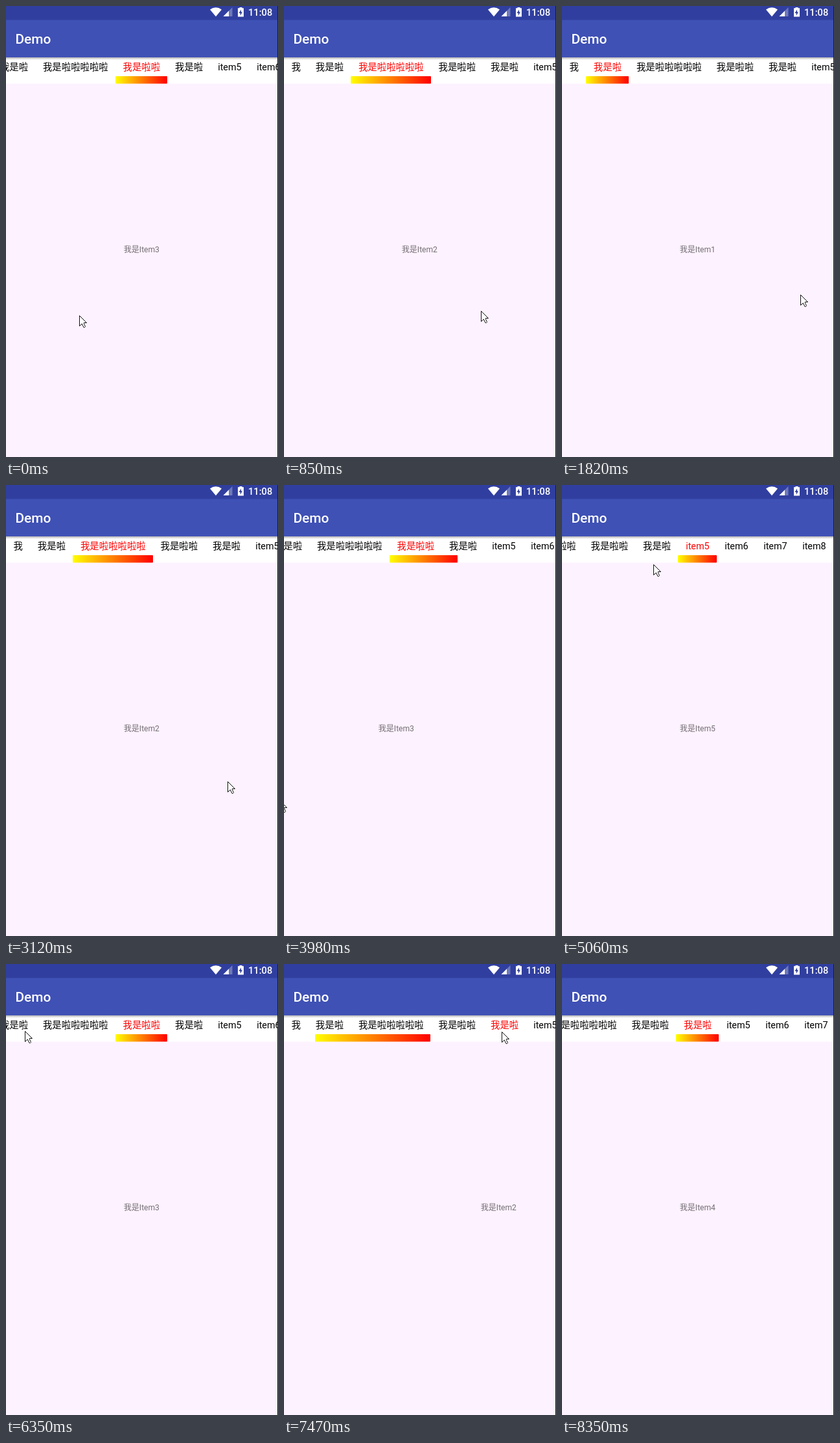
An HTML page that plays this animation: 420 by 694 pixels, repeating every 8840 ms.

```html
<!DOCTYPE html>
<html lang="zh">
<head>
<meta charset="utf-8">
<title>Demo</title>
<style>
  html, body { margin: 0; width: 100%; height: 100%; overflow: hidden; background: #fdf2ff; }
  svg { display: block; width: 420px; height: 694px; font-family: Roboto, "Noto Sans CJK SC", "Noto Sans CJK", sans-serif; }
  .bar { fill: #fff; font-weight: 500; }
  #tabs { font-size: 14.4px; }
  #tabs .on { fill: #f00; }
  #pages { font-size: 12.1px; fill: #746f75; text-anchor: middle; }
</style>
</head>
<body>
<svg viewBox="0 0 420 694">
  <defs>
    <linearGradient id="glow"><stop stop-color="#ff0"/><stop offset="1" stop-color="#f00"/></linearGradient>
    <linearGradient id="shade" x2="0" y2="1">
      <stop stop-color="#000" stop-opacity=".3"/><stop offset="1" stop-color="#000" stop-opacity="0"/>
    </linearGradient>
  </defs>
  <rect width="420" height="694" fill="#fdf2ff"/>
  <g id="pages"></g>
  <rect y="79" width="420" height="40.5" fill="#fff"/>
  <g id="tabs"></g>
  <rect id="mark" y="108" height="11.6" rx="1" fill="url(#glow)"/>
  <rect y="79" width="420" height="4" fill="url(#shade)"/>
  <rect width="420" height="79" fill="#3f51b5"/>
  <rect width="420" height="21.5" fill="#303f9f"/>
  <g class="bar">
    <path d="M315 5.5Q324 -1.2 333 5.5L324 16.3Z"/>
    <path d="M349.5 2V16H335.5Z" opacity=".3"/>
    <path d="M344 7.5V16H335.5Z"/>
    <path d="M360.5 3.3V2h4v1.3H367V16.5h-9V3.3Z"/>
    <path d="M363 5.5L359.5 11H361.7V15L365 9.3H363Z" fill="#303f9f"/>
    <text x="374" y="15" font-size="14.7">11:08</text>
    <text x="14.4" y="58" font-size="20.9">Demo</text>
  </g>
  <rect x="419" width="1" height="694" fill="#1c1c24"/>
  <path id="cursor" d="M.5 .5V16.5L4.3 13L7 18.5H8.5L9.5 17.5L7.3 12.5V11.5H11.5Z" fill="#fff" stroke="#111"/>
</svg>
<script>
const LOOP = 8840, WIDTH = 419, FIRST_PAGE = 3, EDGE_POWER = 5.2;
const LEAD = 190, TRAVEL = 250, FLICK = 120, FLICK_X = 227, SWIPE = 440;

const $ = id => document.getElementById(id);
const lerp = (a, b, k) => a + (b - a) * k;
const progress = (t, start, span) => Math.min(1, Math.max(0, (t - start) / span));
const smooth = k => k * k * (3 - 2 * k);
const easeOut = k => 1 - (1 - k) ** 5;
const easeInOut = k => k < .5 ? 4 * k ** 3 : 1 - 4 * (1 - k) ** 3;

// Start, page wanted, pointer position. The next page is swiped to, farther ones
// are tapped in the strip, and the current page only moves the pointer.
const gestures = [
  [440, 2, 77, 469], [1320, 1, 141, 444], [2230, 2, 370, 444],
  [3170, 3, 342, 456], [3859, 4, 220, 485], [4540, 5, 300, 474],
  [5250, 5, 141, 122], [5620, 3, 68, 105], [6540, 1, 29, 103],
  [7450, 4, 336, 104], [8220, 4, 435, 384], [8540, 4, 400, 700]
];

const turns = [], legs = [];
gestures.reduce((from, [start, to, x, y]) => {
  const pages = Math.abs(to - from), swiped = pages === 1;
  legs.push({ start: start - LEAD - TRAVEL, span: TRAVEL, x, y });
  if (swiped) legs.push({ start, span: FLICK, x: x + (from - to) * FLICK_X, y });
  turns.push({ start, to, swiped, span: swiped ? SWIPE : 100 * (pages + 1) });
  return to;
}, FIRST_PAGE);

function addText(parent, text, y) {
  const el = document.createElementNS('http://www.w3.org/2000/svg', 'text');
  el.textContent = text;
  el.setAttribute('y', y);
  $(parent).append(el);
  return el;
}

let edge = 0;
const labels = [1, 3, 7, 4, 3].map(n => '我是'.slice(0, n) + '啦'.repeat(Math.max(0, n - 2)));
for (let n = 5; n <= 8; n++) labels.push('item' + n);
const tabs = labels.map((label, i) => {
  const left = edge;
  edge += i < 5 ? label.length * 14.37 + 23 : 60;
  return {
    left, right: edge,
    scroll: Math.max(0, (left + edge) / 2 - 209),
    el: addText('tabs', label, 99),
    page: addText('pages', '我是Item' + i, 379)
  };
});

function pagerAt(t) {
  let pos = FIRST_PAGE, selected = FIRST_PAGE;
  for (const { start, span, to, swiped } of turns) {
    if (t < start) break;
    const k = progress(t, start, span);
    pos = lerp(pos, to, swiped ? easeInOut(k) : easeOut(k));
    if (!swiped || k >= .5) selected = to;
  }
  return { pos, selected };
}

function cursorAt(t) {
  let x = 113, y = 476;
  for (const leg of legs) {
    const k = smooth(progress(t, leg.start, leg.span));
    x = lerp(x, leg.x, k);
    y = lerp(y, leg.y, k);
  }
  return [Math.round(x), Math.round(y)];
}

function draw(t) {
  const { pos, selected } = pagerAt(t);
  const i = Math.floor(pos), f = pos - i;
  const a = tabs[i], b = tabs[i + 1];
  const scroll = Math.floor(lerp(a.scroll, b.scroll, f));

  tabs.forEach((tab, n) => {
    tab.el.setAttribute('x', tab.left + 11.5 - scroll);
    tab.el.setAttribute('class', n === selected ? 'on' : '');
    tab.page.setAttribute('x', 209.3 + Math.round((n - pos) * WIDTH));
  });

  // The leading edge runs ahead, the trailing edge catches up late.
  const left = Math.floor(lerp(a.left, b.left, f ** EDGE_POWER));
  const right = Math.floor(lerp(a.right, b.right, 1 - (1 - f) ** EDGE_POWER));
  $('mark').setAttribute('x', left - scroll);
  $('mark').setAttribute('width', right - left);
  $('cursor').setAttribute('transform', `translate(${cursorAt(t)})`);
}

const begin = performance.now();
function tick() {
  draw((performance.now() - begin) % LOOP);
  requestAnimationFrame(tick);
}
tick();
</script>
</body>
</html>
```
